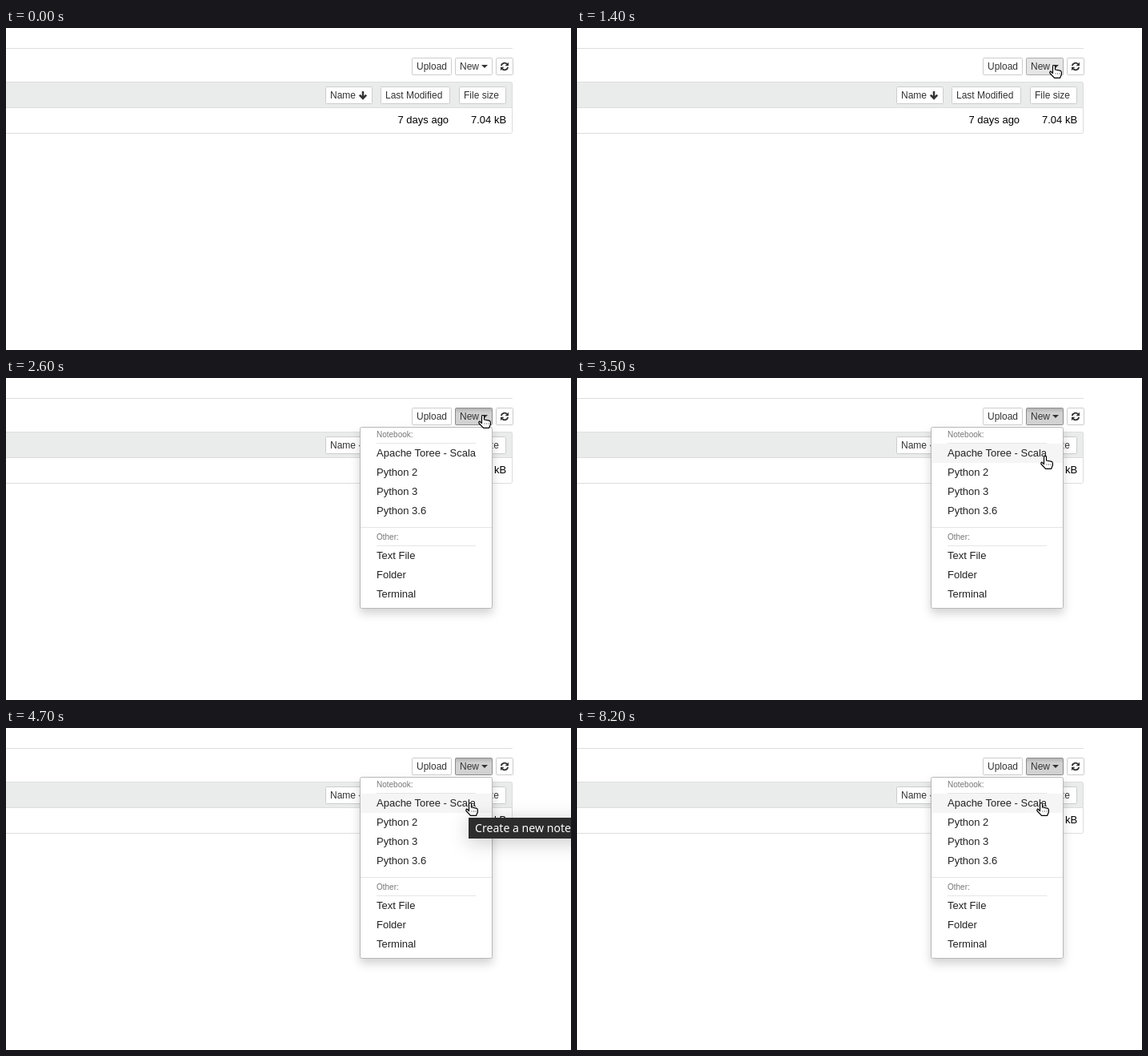
Recreate the animation shown at these times as an HTML page. Size 706 by 402 pixels, loop 8.4 s.

```html
<!DOCTYPE html>
<html lang="en">
<head>
<meta charset="utf-8">
<title>New notebook menu</title>
<style>
  html, body { margin: 0; width: 100%; height: 100%; overflow: hidden; background: #fff; }
  svg { display: block; width: 706px; height: 402px; font: 12px "Liberation Sans", Arial, sans-serif; fill: #333; }
  .button rect { fill: #fff; stroke: #ccc; }
  .button.hover rect { fill: #e6e6e6; stroke: #adadad; }
  .button.open rect { fill: #d2d2d2; stroke: #8c8c8c; }
  .button .inset { display: none; }
  .button.open .inset { display: inline; }
  .line { stroke: #ddd; fill: none; }
  .cell, .item { font-size: 13px; fill: #000; }
  .item { fill: #222; }
  .heading { font-size: 10px; fill: #777; }
  .rule { stroke: #e5e5e5; }
  #menu > .panel { fill: #fff; stroke: #b8b8b8; filter: drop-shadow(0 6px 6px rgba(0, 0, 0, .175)); }
  #tip > rect { fill: #2d2d2d; filter: drop-shadow(0 4px 12px rgba(0, 0, 0, .22)); }
  #tip > text { font: 14.1px "Noto Sans", "Open Sans", sans-serif; fill: #fff; }
  .pointer { fill: #fff; stroke: #000; stroke-width: 1.2; stroke-linejoin: round; }
</style>
</head>
<body>
<svg viewBox="0 0 706 402">
  <defs>
    <linearGradient id="shade" x2="0" y2="1">
      <stop stop-opacity=".14"/><stop offset="1" stop-opacity="0"/>
    </linearGradient>
  </defs>
  <path class="line" d="M0 25.5H633"/>
  <path fill="#eaecec" d="M0 67H631L633 69V100H0Z"/>
  <path class="line" d="M0 67.5H630.5Q632.5 67.5 632.5 69.5V129.5Q632.5 131.5 630.5 131.5H0M0 99.5H632"/>
  <text class="cell" x="489.5" y="119">7 days ago</text>
  <text class="cell" x="581" y="119">7.04 kB</text>

  <g id="buttons"></g>
  <path d="M594 46h8l-4 4z"/>
  <path d="M446 79V88M441.8 83.6L446 87.9L450.2 83.6" fill="none" stroke="#333" stroke-width="2.5"/>
  <g id="refresh" transform="translate(623 48)"></g>

  <g id="menu">
    <rect class="panel" x="442.5" y="61.5" width="165" height="226" rx="2"/>
    <rect id="highlight" x="443" width="164" height="24" fill="#f5f5f5"/>
    <path class="rule" d="M463 81.5H587M443 186.5H607M463 209.5H587"/>
    <text class="heading" x="463" y="74">Notebook:</text>
    <text class="heading" x="463" y="202">Other:</text>
    <g id="items"></g>
  </g>

  <g id="hand" class="pointer">
    <path d="M4.5 10.5V2a1.5 1.5 0 0 1 3 0V6L13.5 7.2Q15.4 7.7 15.4 9.5V12L13.5 16.4H6.5L1 10.5Q.4 8.4 2 8.2Z"/>
    <path d="M8 10.5v2M10.5 10.5v2M13 10.5v2" stroke-width=".8" stroke-dasharray="1"/>
  </g>
  <path id="arrow" class="pointer" d="M0 0V14.5L3.4 11.3L5.8 16.5L8.2 15.4L5.9 10.4H10.5Z"/>

  <g id="tip">
    <rect x="578" y="112" width="180" height="26"/>
    <text x="586" y="130">Create a new notebook</text>
  </g>
</svg>
<script>
const LOOP = 8400;
const $ = id => document.getElementById(id);
const show = (el, on) => el.setAttribute("display", on ? "inline" : "none");

// label, x, y, width
const buttons = [
  ["Upload", 507, 37, 50], ["New", 561, 37, 47], ["", 612, 37, 22],
  ["Name", 399, 73, 59], ["Last Modified", 468, 73, 87], ["File size", 566, 73, 59]
];
$("buttons").innerHTML = buttons.map(([label, x, y, w]) => `
  <g class="button">
    <rect x="${x + .5}" y="${y + .5}" width="${w - 1}" height="21" rx="1"/>
    <path class="inset" fill="url(#shade)" d="M${x + 1} ${y + 1}h${w - 2}v6h${2 - w}z"/>
    <text x="${x + 6}" y="${y + 15}">${label}</text>
  </g>`).join("");
const buttonEls = [...$("buttons").children];

const halfRefresh = `<path d="M-4.2 -.9A4.2 4.2 0 0 1 3 -3" fill="none" stroke="#333" stroke-width="1.9"/>
  <path d="M5 -5.2V-.7H.6Z"/>`;
$("refresh").innerHTML = halfRefresh + `<g transform="rotate(180)">${halfRefresh}</g>`;

const items = [
  ["Apache Toree - Scala", 98], ["Python 2", 122], ["Python 3", 146], ["Python 3.6", 170],
  ["Text File", 226], ["Folder", 250], ["Terminal", 274]
];
$("items").innerHTML = items.map(([label, y]) => `<text class="item" x="463" y="${y}">${label}</text>`).join("");

// time, x, y of the pointer's hot spot
const path = [
  [300, 88, 264], [400, 118, 251], [600, 184, 229], [800, 390, 138], [900, 492, 96],
  [1000, 541, 74], [1100, 562, 66], [1200, 585, 55], [1400, 596, 46], [3000, 596, 46],
  [3100, 597, 60], [3200, 598, 88], [3300, 597, 120], [3400, 591, 110],
  [3500, 585, 97], [3900, 580, 93], [LOOP, 580, 93]
];

function pointerAt(t) {
  const i = path.findIndex(p => p[0] > t);
  const [t0, x0, y0] = path[i - 1], [t1, x1, y1] = path[i];
  const k = (t - t0) / (t1 - t0);
  return [Math.round(x0 + (x1 - x0) * k), Math.round(y0 + (y1 - y0) * k)];
}

function tipOpacity(t) {
  if (t < 8000) return Math.min(1, Math.max(0, (t - 4100) / 600));
  return Math.max(0, .52 - (t - 8000) / 300);
}

function draw(time) {
  const t = Math.floor(time % LOOP / 100) * 100;
  const visible = t >= 300, menuOpen = t >= 2500;
  const [x, y] = visible ? pointerAt(t) : [-99, -99];

  const overMenu = menuOpen && x > 442 && x < 608 && y > 61;
  const hoveredItem = overMenu ? items.find(([, base]) => y >= base - 16 && y < base + 8) : null;
  let overButton = false;
  buttons.forEach(([label, bx, by, w], i) => {
    const hover = !overMenu && x >= bx && x < bx + w && y >= by && y < by + 22;
    overButton ||= hover;
    buttonEls[i].classList.toggle("hover", hover);
    buttonEls[i].classList.toggle("open", label === "New" && t >= 2400);
  });

  show($("menu"), menuOpen);
  show($("highlight"), hoveredItem);
  if (hoveredItem) $("highlight").setAttribute("y", hoveredItem[1] - 16);

  const useHand = overButton || hoveredItem;
  show($("hand"), visible && useHand);
  show($("arrow"), visible && !useHand);
  $("hand").setAttribute("transform", `translate(${x - 6} ${y})`);
  $("arrow").setAttribute("transform", `translate(${x} ${y})`);
  $("tip").setAttribute("opacity", tipOpacity(t));
}

const start = performance.now();
function tick() {
  draw(performance.now() - start);
  requestAnimationFrame(tick);
}
tick();
</script>
</body>
</html>
```
